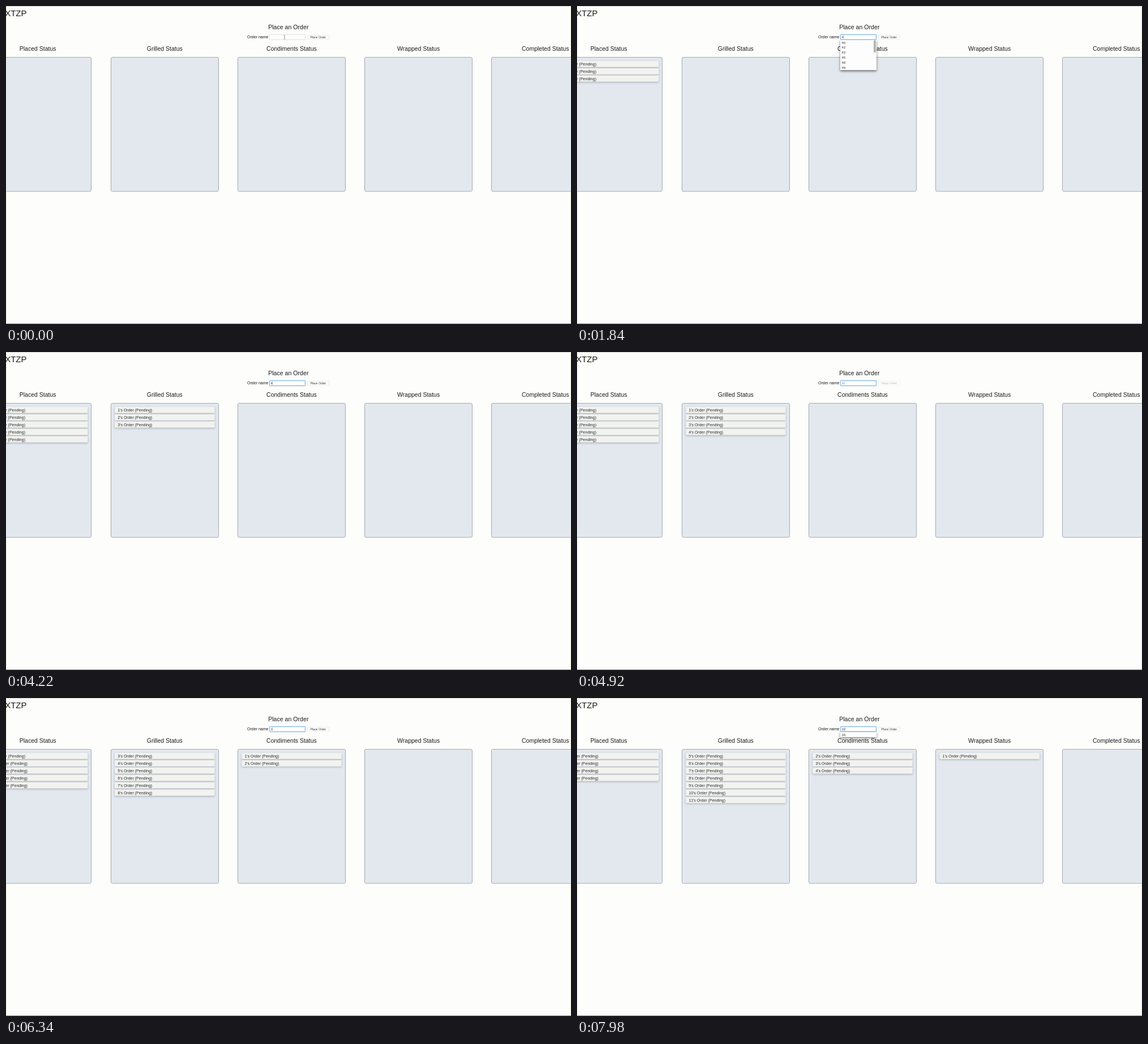
Recreate the animation shown at these times as an HTML page with a canvas. Size 998 px wide and 561 px high, loop 8 s.

```html
<!DOCTYPE html>
<html lang="en">
<head>
<meta charset="utf-8">
<title>Order board</title>
<style>
  html, body { margin: 0; width: 100%; height: 100%; overflow: hidden; background: #fdfdfb; }
  canvas { display: block; width: 998px; height: 561px; }
</style>
</head>
<body>
<canvas id="stage"></canvas>
<script>
const W = 998, H = 561, LOOP = 8000;
const FONT = '"Liberation Sans", Arial, sans-serif';
const canvas = document.getElementById('stage');
const ctx = canvas.getContext('2d');
const ratio = window.devicePixelRatio || 1;
canvas.width = Math.round(W * ratio);
canvas.height = Math.round(H * ratio);

const PITCH = 224.15;
const STAGES = ['Placed', 'Grilled', 'Condiments', 'Wrapped', 'Completed'];

// Times at which orders 1, 2, 3... enter each column.
const ARRIVALS = [
  [700, 1150, 1600, 2150, 2700, 3180, 3700, 4120, 4520, 4950, 5330, 5780, 6250, 6750, 7200, 8200],
  [3400, 3760, 4080, 4560, 4940, 5400, 5900, 6300, 6820, 7400, 7800],
  [5200, 6220, 7540, 7860],
  [6900],
  []
];
const FOCUS_AT = 180, SUBMIT_LEAD = 110, LIST_LAG = 60, KEY_GAP = 80;

function text(str, x, y, size, color = '#1c1c1e', align = 'left') {
  ctx.font = `${size}px ${FONT}`;
  ctx.fontKerning = 'none';
  ctx.textAlign = align;
  ctx.fillStyle = color;
  ctx.fillText(str, x, y);
}

function box(x, y, w, h, r, fill, stroke, line = 1) {
  ctx.beginPath();
  ctx.roundRect(x, y, w, h, r);
  if (fill) { ctx.fillStyle = fill; ctx.fill(); }
  if (stroke) { ctx.strokeStyle = stroke; ctx.lineWidth = line; ctx.stroke(); }
}

function shadow(color, blur, dy) {
  ctx.shadowColor = color;
  ctx.shadowBlur = blur * ratio;
  ctx.shadowOffsetY = dy * ratio;
}

const countBy = (times, t) => times.filter(at => at <= t).length;

function drawCard(x, y, n) {
  ctx.save();
  shadow('rgba(70,75,95,0.38)', 3.5, 1.2);
  box(x, y, 176.5, 11, 1.5, '#f2f2ef');
  ctx.restore();
  text(`${n}'s Order (Pending)`, x + 5.2, y + 8.3, 7, '#2a2a2c');
}

function drawColumns(t) {
  const counts = ARRIVALS.map(times => countBy(times, t));
  STAGES.forEach((name, i) => {
    const x = -39.1 + PITCH * i;
    text(name + ' Status', x + 95.2, 78.5, 10.5, '#1c1c1e', 'center');
    box(Math.floor(x) + 0.5, 90.5, 190, 236.5, 2.5, '#e3e8ef', '#a3a8b1');
    const gone = counts[i + 1] || 0;
    for (let n = gone + 1; n <= counts[i]; n++) {
      drawCard(x + 7, 96.7 + 12.95 * (n - gone - 1), n);
    }
  });
}

function suggestions(query) {
  if (query.length > 1) return [query];
  const ends = query === '4' ? [0, 2, 3, 5, 8, 9] : [0, 1, 2, 3, 4, 5];
  return ends.map(d => query + d);
}

// State of the order field: its value, suggestion query and disabled flag.
function fieldState(t) {
  const placed = ARRIVALS[0];
  const done = countBy(placed, t);
  const start = done ? placed[done - 1] : FOCUS_AT;
  const end = placed[done];
  const label = String(done + 1);
  const firstKey = start + 0.18 * (end - start);
  const typedAt = at => {
    const keys = at < firstKey ? 0 : 1 + Math.floor((at - firstKey) / KEY_GAP);
    return label.slice(0, keys);
  };
  const sending = t >= end - SUBMIT_LEAD;
  return { value: typedAt(t), query: sending ? '' : typedAt(t - LIST_LAG), sending };
}

function drawList(query) {
  const items = suggestions(query);
  const full = items.length > 1;
  const h = full ? 53 : 9;
  ctx.save();
  shadow('rgba(0,0,0,0.55)', 4, 1.5);
  box(465, 60, 64, h, 0, '#fdfdfd');
  ctx.restore();
  ctx.save();
  ctx.beginPath();
  ctx.rect(465, 60, 64, h);
  ctx.clip();
  items.forEach((s, i) => text(s, 467.6, 66.6 + 8.8 * i, 6, '#2c2c2e'));
  if (full) box(524, 60.5, 4, 21.5, 1.5, '#b4b4b4');
  ctx.restore();
}

function drawPointer(x, y) {
  ctx.fillStyle = '#77777a';
  ctx.fillRect(x - 0.4, y - 3, 0.8, 6);
  ctx.fillRect(x - 1.3, y - 3.4, 2.6, 0.6);
  ctx.fillRect(x - 1.3, y + 2.8, 2.6, 0.6);
}

function drawForm(t) {
  const focused = t >= FOCUS_AT;
  const { value, query, sending } = fieldState(t);
  text('Place an Order', 498.8, 41, 10.6, '#1c1c1e', 'center');
  text('Order name', 426, 57.2, 7.03);
  if (focused) {
    box(465.5, 50.5, 63, 9, 0.8, '#fff', 'rgba(120,180,230,0.25)', 2.4);
    box(465.5, 50.5, 63, 9, 0.8, null, '#86bce8');
  } else {
    box(465.5, 50.5, 63, 9, 0, '#fff', '#d8d8d2', 0.8);
  }
  text(value, 467.4, 57, 5.2, sending ? '#77777a' : '#444447');
  if (focused && !sending) {
    const caret = 467.5 + ctx.measureText(value).width;
    ctx.fillStyle = '#77777c';
    ctx.fillRect(caret, 52.3, 0.6, 5.4);
  }
  box(532.4, 51.5, 38.4, 7.4, 0.8, '#fefefe', sending ? '#eeeeea' : '#e2e2dc', 0.7);
  text('Place Order', 551.3, 57, 5.2, sending ? '#bcbcbe' : '#333335', 'center');
  if (query) drawList(query);
  if (!value && t < 480) drawPointer(492, 55);
}

function drawFrame() {
  ctx.fillStyle = '#fdfdfb';
  ctx.fillRect(0, 0, W, H);
  ctx.fillStyle = '#d2d2d0';
  ctx.fillRect(0, 0, W, 1);
  ctx.fillStyle = '#e9e9d8';
  ctx.fillRect(0, 0, 1, H);
  ctx.fillRect(W - 1, 0, 1, H);
  ctx.fillStyle = '#8e8e90';
  ctx.fillRect(0, H - 1, W, 1);
}

function render(now) {
  const t = now % LOOP;
  ctx.setTransform(ratio, 0, 0, ratio, 0, 0);
  drawFrame();
  text('XTZP', -1.8, 17.8, 15);
  drawColumns(t);
  drawForm(t);
}

let origin = null;
function tick(now) {
  if (origin === null) origin = now;
  render(now - origin);
  requestAnimationFrame(tick);
}
render(0);
requestAnimationFrame(tick);
</script>
</body>
</html>
```
